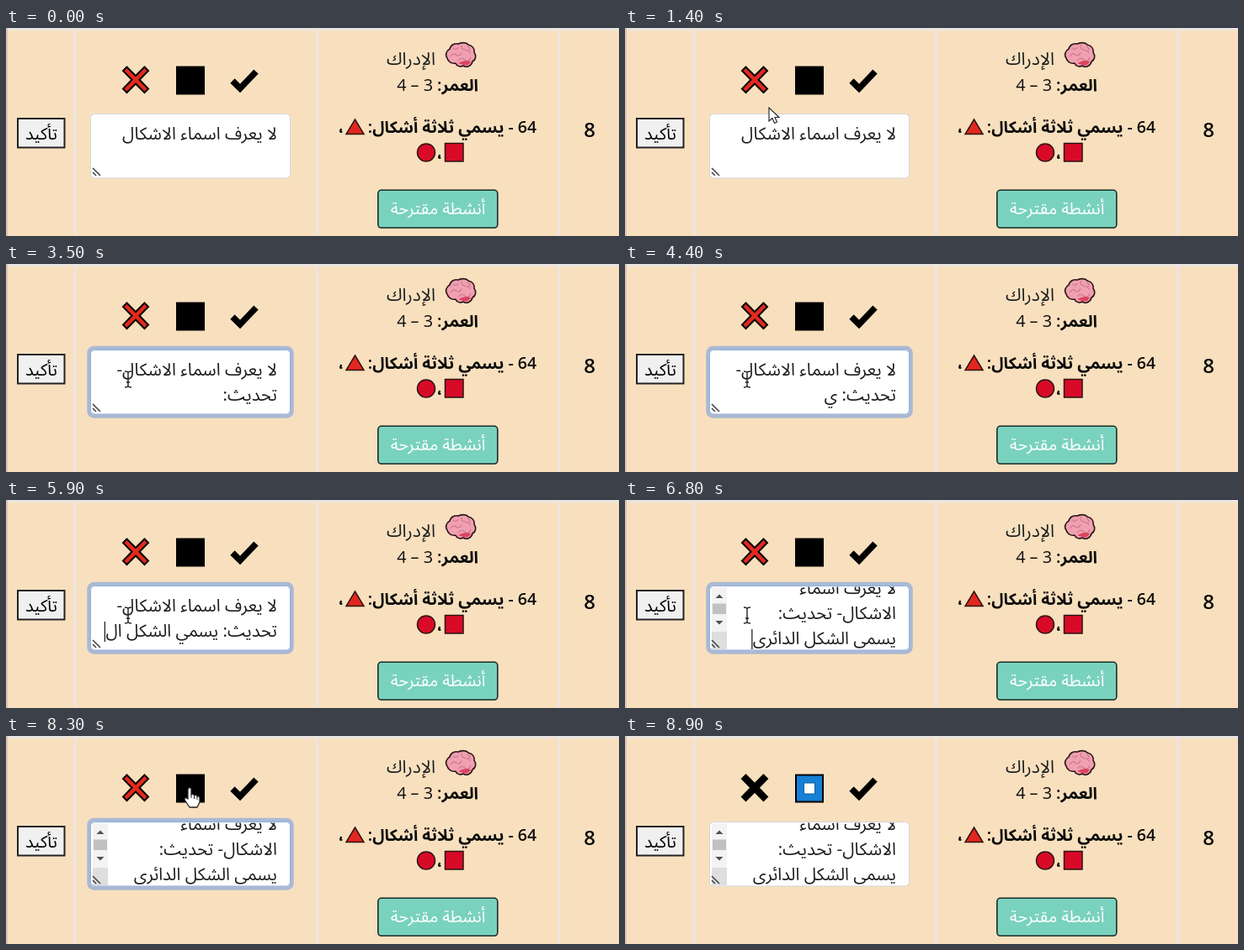
Write an HTML page that moves like this. It is 728x248 px and loops after 9800 ms.

```html
<!DOCTYPE html>
<html lang="ar">
<head>
<meta charset="utf-8">
<style>
  html, body { margin: 0; width: 100%; height: 100%; overflow: hidden; }
  svg { display: block; width: 728px; height: 248px; background: #f8e0be; }
  text { font: 20.6px "Open Sans", "Noto Sans Arabic", "DejaVu Sans", sans-serif; fill: #1b1e21; direction: rtl; white-space: pre; }
  .b { font-weight: 600; fill: #0c0c0c; }
  .mid { text-anchor: middle; }
  .shape { fill: #d80a28; stroke: #2b1512; stroke-width: 1.5; }
</style>
</head>
<body>
<svg viewBox="0 0 728 248">
  <path d="M0 1.5H728M82 0V248M369.5 0V248M657 0V248" stroke="#ebe5e3" stroke-width="3"/>
  <path d="M1 0V248" stroke="#dcc3bb" stroke-width="2"/>

  <text class="b mid" x="693" y="130" style="font-size:24px">8</text>

  <g stroke="#2a1519" stroke-width="1.600" stroke-linejoin="round">
    <path fill="#f0a0b0" d="M524 36C521 32 523 27 527 25C528 20 533 18 537 19C541 17 547 17 549 20C554 21 557 25 556 29C559 33 558 38 554 40C553 45 547 48 543 45C539 47 535 45 534 42C529 43 525 40 524 36Z"/>
    <path fill="none" stroke="#c8788c" stroke-width="1.100" d="M528 34Q531 29 535 32T541 29M531 24Q535 27 537 23M541 20Q540 25 545 26T551 30M537 39Q541 34 545 38T552 35M548 22Q552 24 550 27"/>
    <path fill="#dc4460" stroke="none" d="M537 42Q545 37 552 40Q549 46 543 44Z"/>
  </g>
  <text x="510" y="44" style="font-size:21px">الإدراك</text>
  <text class="b" x="561" y="75" style="font-size:19.800px">العمر:<tspan font-weight="400"> 3 – 4</tspan></text>
  <text class="b" x="630" y="125" style="font-size:19.400px">64 - يسمي ثلاثة أشكال:</text>
  <path class="shape" d="M414.500 109L425 126.500H404Z" style="fill:#e3261f"/>
  <text class="b mid" x="398" y="125">،</text>
  <rect class="shape" x="521.500" y="137.500" width="21.500" height="21.500"/>
  <text class="b mid" x="515" y="156">،</text>
  <circle class="shape" cx="499" cy="148.500" r="10.500"/>

  <rect x="441.800" y="193.300" width="142" height="45" rx="4" fill="#79d2be" stroke="#1c2b28" stroke-width="1.600"/>
  <text class="mid" x="513" y="222" style="fill:#fff;font-size:20px">أنشطة مقترحة</text>

  <rect x="14" y="108" width="55.500" height="34.500" fill="#f0f0f0" stroke="#222" stroke-width="2"/>
  <text class="mid" x="42" y="133" style="font-size:20px;fill:#000">تأكيد</text>

  <path d="M269 63L278 72L297 52" fill="none" stroke="#000" stroke-width="7.500"/>
  <path id="cross" d="M139 51L143.500 46.500L154 57L164.500 46.500L169 51L158.500 61.700L169 72.500L164.500 77L154 66.500L143.500 77L139 72.500L149.500 61.700Z" stroke="#000" stroke-width="2"/>
  <rect x="202" y="45.500" width="34" height="34"/>
  <g id="picked">
    <rect x="204" y="47.500" width="30" height="30" fill="#1580d6"/>
    <rect x="212.500" y="56" width="13" height="13" fill="#fff" stroke="#0f5c9e"/>
  </g>

  <rect id="ring" x="98.500" y="100" width="241" height="81.500" rx="6" fill="none" stroke="#aab9d2" stroke-width="4.500"/>
  <rect id="box" x="100.500" y="102.500" width="237" height="76.500" rx="5" fill="#fff"/>
  <clipPath id="clip"><rect x="101" y="103.500" width="236" height="75"/></clipPath>
  <g id="lines" clip-path="url(#clip)">
    <text x="322"/><text x="322"/><text x="322"/>
  </g>
  <path id="caret" stroke="#222" stroke-width="1.300"/>
  <g id="bar">
    <rect x="103" y="104" width="18" height="53" fill="#f3f3f3"/>
    <rect x="103" y="157" width="18" height="21" fill="#dedede"/>
    <rect x="104" y="123.500" width="16" height="12.500" fill="#c1c1c1"/>
    <path d="M107.500 117L112 112.500L116.500 117ZM107.500 144L112 148.500L116.500 144Z" fill="#505050"/>
  </g>
  <path d="M103 167L112 176M103 172L107 176" stroke="#444" stroke-width="1.600"/>

  <g id="arrow"><path d="M0 0V16L4 12.500L6.500 18.500L9.500 17L7 11.500H12Z" fill="#fff" stroke="#222" stroke-width="1.100"/></g>
  <g id="beam"><path d="M-4 -9Q0 -9 0 -7Q0 -9 4 -9M0 -7V8M-4 10Q0 10 0 8Q0 10 4 10M-2 4H2" fill="none" stroke="#222" stroke-width="1.400"/></g>
  <g id="hand"><path d="M-2 1Q0 -2 2 1V8Q4 6 5.500 9Q8 7 9 10Q12 9 12 12V17L9 23H0L-6 14Q-6 10 -2 13Z" fill="#fff" stroke="#222" stroke-width="1.300" stroke-linejoin="round"/><path d="M2 8V12M5.500 9V13M9 10V14" stroke="#222"/></g>
</svg>
<script>
const $ = id => document.getElementById(id);
const show = (id, on) => $(id).style.display = on ? "" : "none";
const rows = [...document.querySelectorAll("#lines text")];
const LOOP = 9800, CLICK = 2000, PICK = 8400;
const first = "لا يعرف اسماء الاشكال";
const typed = "- تحديث: يسمي الشكل الدائري";

// [time, value...] keys
const typing = [[2000, 0], [2400, 3], [3000, 3], [3500, 8], [4000, 8], [4300, 10], [4400, 10], [5900, 22], [6700, 27]];
const mouse = [[300, 88, 250], [800, 92, 160], [1300, 171, 95], [1500, 171, 95], [1900, 145, 137],
  [7100, 145, 137], [7600, 123.5, 185], [8000, 123.5, 185], [8300, 218, 62], [8500, 218, 62], [8900, 250, -25]];

function sample(keys, t, ease = u => u) {
  const i = keys.findIndex(k => k[0] > t);
  if (i < 0) return keys.at(-1).slice(1);
  if (!i) return keys[0].slice(1);
  const a = keys[i - 1], b = keys[i], u = ease((t - a[0]) / (b[0] - a[0]));
  return a.slice(1).map((v, j) => v + (b[j + 1] - v) * u);
}

function layout(n) {
  const s = typed.slice(0, n);
  if (n > 22) return [first.slice(0, 13), first.slice(14) + typed.slice(0, 8), typed.slice(9, n)];
  return n < 3 ? [first + s] : [first + "-", s.slice(2)];
}

function draw(t) {
  const n = Math.floor(sample(typing, t)[0] + 1e-6);
  const text = layout(n), scrolled = text.length > 2;
  const focus = t >= CLICK && t < PICK, picked = t >= PICK;
  const baseline = i => (scrolled ? 112 : 133) + 30 * i;
  rows.forEach((row, i) => {
    row.textContent = text[i] || "";
    row.setAttribute("y", baseline(i));
  });
  show("bar", scrolled);
  show("ring", focus);
  $("box").setAttribute("stroke", focus ? "#8eb0e2" : "#d3d6da");
  show("picked", picked);
  $("cross").setAttribute("fill", picked ? "#000" : "#e3291d");

  const last = text.length - 1, y = baseline(last);
  const x = 321 - rows[last].getComputedTextLength();
  $("caret").setAttribute("d", `M${x} ${y - 18}V${y + 6}`);
  show("caret", focus && (t + 300) % 1000 < 500);

  const [mx, my] = sample(mouse, t, u => u * u * (3 - 2 * u));
  const inBox = mx > 100 && mx < 338 && my > 102 && my < 179;
  const kind = inBox ? "beam" : t >= 7100 ? "hand" : "arrow";
  for (const id of ["arrow", "beam", "hand"]) {
    show(id, id === kind && t >= 300 && t < 8900);
    $(id).setAttribute("transform", `translate(${mx} ${my})`);
  }
}

const start = performance.now();
function tick() {
  draw(Math.floor((performance.now() - start) % LOOP / 100) * 100);
  requestAnimationFrame(tick);
}
tick();
</script>
</body>
</html>
```
